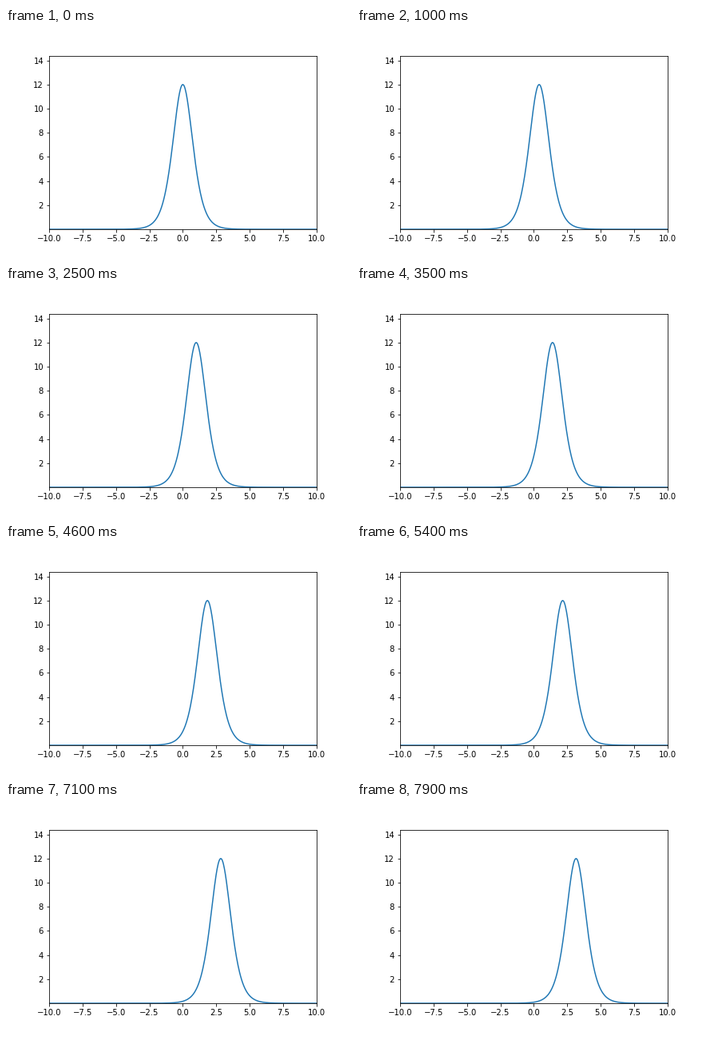
A matplotlib script that plays this animation: 432x288 px, repeating every 8000 ms.

```python
import numpy as np
import matplotlib.pyplot as plt
from matplotlib.animation import FuncAnimation

FRAMES, INTERVAL = 80, 100
DT = 0.01      # model time per frame
K = 1.0        # soliton wavenumber

plt.rcParams.update({"font.family": "DejaVu Sans", "font.size": 10})


def soliton(x, t):
    """KdV soliton: height 12 k^2, speed 4 k^2."""
    return 12 * K**2 / np.cosh(K * (x - 4 * K**2 * t)) ** 2


x = np.linspace(-10, 10, 512)
u0 = soliton(x, 0)

fig, ax = plt.subplots(figsize=(6, 4), dpi=72, facecolor="white")
fig.subplots_adjust(left=0.125, right=0.9, bottom=0.125, top=0.88)
ax.set_xlim(-10, 10)
# Lower limit sits just above zero, so the axis has no tick there.
ax.set_ylim(u0.min(), 1.2 * 12 * K**2)
ax.set_xticks(np.arange(-10, 10.1, 2.5))
line, = ax.plot(x, u0, color="#1f77b4", lw=1.5)


def update(i):
    line.set_ydata(soliton(x, i * DT))
    return line,


anim = FuncAnimation(fig, update, frames=FRAMES, interval=INTERVAL,
                     repeat=True, repeat_delay=0)
plt.show()
```
